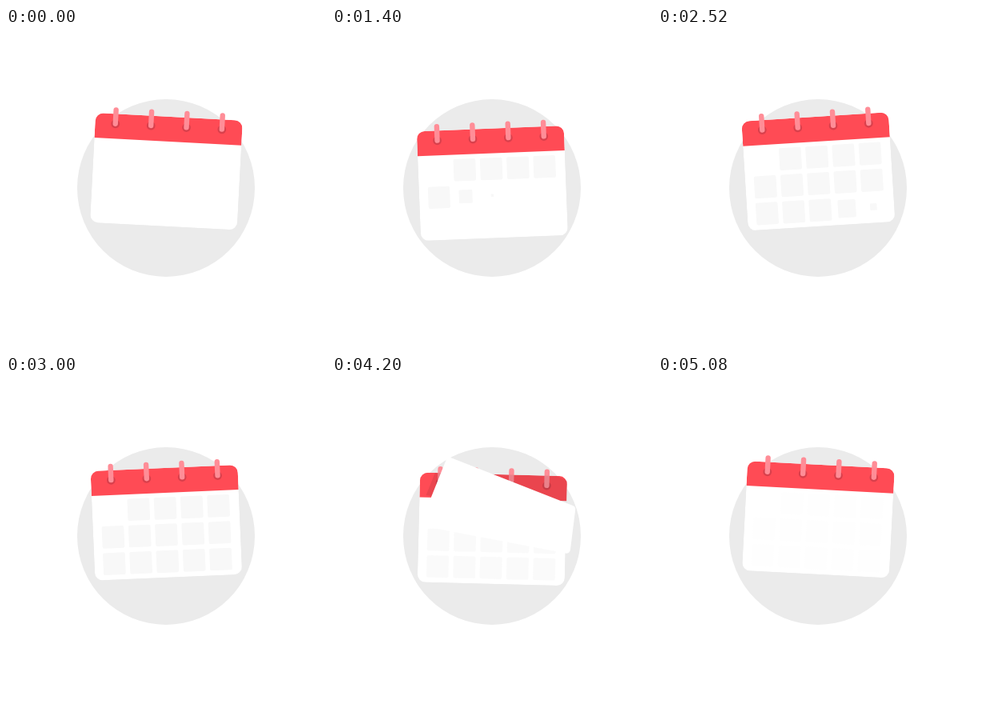
Animation of 400 by 400 pixels, one loop 5.12 s. Source, as an HTML page:

```html
<!DOCTYPE html>
<html lang="en">
<head>
<meta charset="utf-8">
<title>Calendar</title>
<style>
  html, body { margin: 0; width: 100%; height: 100%; overflow: hidden; background: #fff; }
  svg { display: block; width: 100vw; height: 100vh; }
</style>
</head>
<body>
<svg viewBox="0 0 400 400">
  <defs>
    <clipPath id="card"><rect x="-92" y="-68.5" width="184" height="137" rx="10"/></clipPath>
  </defs>
  <circle cx="200" cy="200" r="111" fill="#ebebeb"/>
  <g id="calendar">
    <g clip-path="url(#card)">
      <rect x="-92" y="-68.5" width="184" height="137" fill="#fff"/>
      <rect x="-92" y="-68.5" width="184" height="31" fill="#ff4b55"/>
    </g>
    <g id="cells" fill="#f8f8f8"></g>
    <g id="rings"></g>
    <path id="shade" fill="#000" clip-path="url(#card)"/>
    <path id="page" fill="#fff" stroke="#fff" stroke-width="10" stroke-linejoin="round"/>
  </g>
</svg>
<script>
const LOOP = 5120;
const CELL = 27.7, PITCH = 33.3;
const $ = id => document.getElementById(id);

const add = (parent, tag, attrs) => {
  const el = document.createElementNS('http://www.w3.org/2000/svg', tag);
  for (const k in attrs) el.setAttribute(k, attrs[k]);
  return parent.appendChild(el);
};

const clamp = p => Math.min(1, Math.max(0, p));
const ease = p => p * p * (3 - 2 * p);
const linear = p => p;

// Value at time t from a table of [time, value] steps.
function track(steps, t, curve = ease) {
  let i = 1;
  while (i < steps.length - 1 && t > steps[i][0]) i++;
  const [t0, a] = steps[i - 1], [t1, b] = steps[i];
  return a + (b - a) * curve(clamp((t - t0) / (t1 - t0)));
}

const ANGLE = [[0, 3], [2080, -4], [LOOP, 3]];
const HEIGHT = [[0, 179.3], [1320, 194.3], [2560, 179.3], [3840, 194.3], [LOOP, 179.3]];
const CELL_FADE = [[3760, 1], [4520, 0.3], [5080, 0.12], [LOOP, 0]];
const PAGE_FADE = [[3760, 0], [3920, 1], [4440, 1], [4520, 0.93], [4880, 0]];
const SHADE = [[3840, 0], [4440, 0.14], [4520, 0.12], [4840, 0]];

// Sheet corners: lying flat, then torn off. Inset by the rounding stroke.
const FLAT = [[-87, 63.5], [-87, -32.5], [87, -32.5], [87, 63.5]];
const TORN = [[-82, -49], [-36, -114], [105, -24], [97, -2]];

const cells = [];
for (let i = 1; i < 15; i++) {
  const x = -81 + (i % 5) * PITCH + CELL / 2;
  const y = -32 + Math.floor(i / 5) * PITCH + CELL / 2;
  const el = add($('cells'), 'rect', {
    x: -CELL / 2, y: -CELL / 2, width: CELL, height: CELL, rx: 2
  });
  cells.push({ el, x, y });
}

for (const x of [-66.7, -22.2, 22.2, 66.6]) {
  add($('rings'), 'circle', { cx: x, cy: -56, r: 5.4, fill: '#d9404c' });
  add($('rings'), 'rect', { x: x - 3.2, y: -76.7, width: 6.4, height: 23.7, rx: 3.2, fill: '#ff8d97' });
}

function outline(p, rise) {
  return 'M' + FLAT.map(([x, y], i) => {
    const [u, v] = TORN[i];
    return `${x + (u - x) * p} ${y + (v - y) * p - rise}`;
  }).join('L') + 'Z';
}

function draw(t) {
  $('calendar').setAttribute('transform',
    `translate(200.4 ${track(HEIGHT, t)}) rotate(${track(ANGLE, t)})`);

  cells.forEach(({ el, x, y }, i) => {
    const s = ease(clamp((t - 400 - 151 * i) / 430));
    el.setAttribute('transform', `translate(${x} ${y}) scale(${s})`);
  });
  $('cells').setAttribute('opacity', track(CELL_FADE, t, linear));

  const lift = ease(clamp((t - 3760) / 760));
  const rise = 14 * ease(clamp((t - 4520) / 360));
  const path = outline(lift, rise);
  $('page').setAttribute('d', path);
  $('page').setAttribute('opacity', track(PAGE_FADE, t, linear));
  $('shade').setAttribute('d', outline(lift, rise + 34));
  $('shade').setAttribute('opacity', track(SHADE, t, linear));
}

const start = performance.now();
function tick() {
  draw((performance.now() - start) % LOOP);
  requestAnimationFrame(tick);
}
tick();
</script>
</body>
</html>
```
